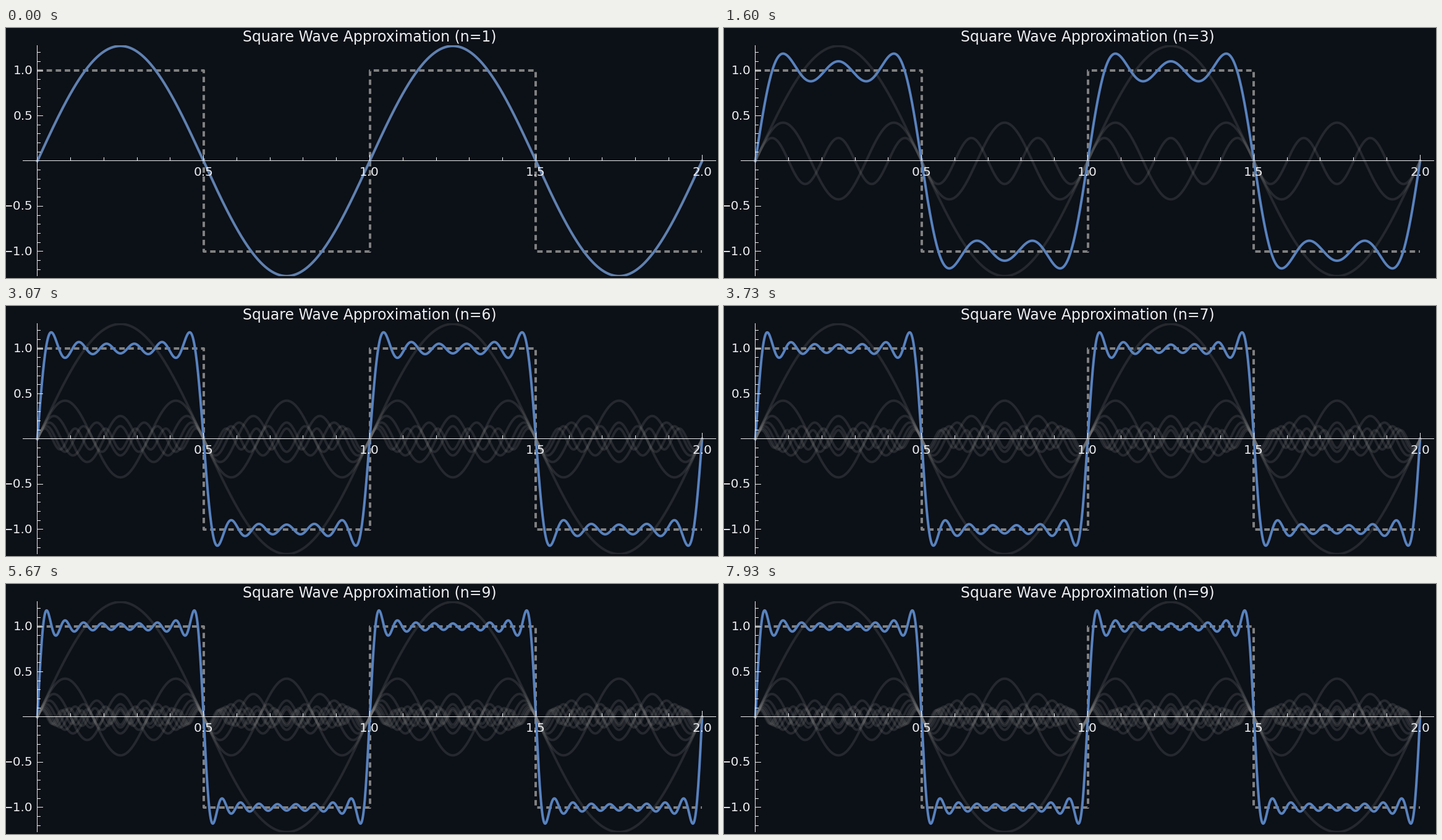
These frames come from a looping animation (1152x406 px, 8000 ms). A matplotlib script:

```python
import numpy as np
import matplotlib.pyplot as plt
from matplotlib.animation import FuncAnimation
from matplotlib.patches import Rectangle

W, H, DPI = 1152, 406, 64
LOOP, STEP = 8000, 40
PT = 72 / DPI  # points per pixel

BG, INK = "#0c1017", "#eceef0"
BLUE, GRAY = "#5882be", "#808080"

LEFT, RIGHT, TOP, BOTTOM = 27, 1149, 28, 403
ORIGIN_X, ORIGIN_Y = 50.75, 216
UNIT_X, UNIT_Y = 537.75, 146.75

MAX_TERMS = 10
# Times at which the number of terms rises by one, and falls back by one
RISES = [333, 1000, 1667, 2333, 3067, 3667, 4333, 5000, 5733]
FALL = 7667

plt.rcParams["font.family"] = "DejaVu Sans"
fig = plt.figure(figsize=(W / DPI, H / DPI), dpi=DPI, facecolor=BG)
ax = fig.add_axes([0, 0, 1, 1])
ax.set_xlim(0, W)
ax.set_ylim(H, 0)
ax.axis("off")


def px(x):
    return ORIGIN_X + UNIT_X * np.asarray(x)


def py(y):
    return ORIGIN_Y - UNIT_Y * np.asarray(y)


def mid(v):
    """Centre of the pixel that holds v, for crisp thin lines."""
    return np.ceil(v) - 0.5


def curve(x, y, color, z, **style):
    line, = ax.plot(px(x), py(y), color=color, lw=4 * PT, zorder=z, **style)
    line.set_clip_path(Rectangle((LEFT, TOP), RIGHT - LEFT, BOTTOM - TOP,
                                 transform=ax.transData))
    return line


def rule(x0, y0, x1, y1):
    ax.plot([x0, x1], [y0, y1], color=INK, lw=PT, zorder=5,
            solid_capstyle="butt", snap=False)


def label(x, y, text, size, ha="center"):
    return ax.text(x, y, text, fontsize=size * PT, color=INK, ha=ha,
                   va="baseline", zorder=6)


def draw_axes():
    x0, y0 = np.floor(ORIGIN_X) + 0.5, mid(ORIGIN_Y)
    rule(LEFT, y0, RIGHT, y0)
    rule(x0, TOP, x0, BOTTOM)
    for i in range(1, 21):
        x = np.floor(px(i / 10)) + 0.5
        major = i % 5 == 0
        rule(x, y0, x, y0 - (9.5 if major else 5.5))
        if major:
            label(px(i / 10) - 0.25, 240.5, f"{i / 10:.1f}", 20)
    for i in range(-12, 13):
        y = py(i / 10)
        major = i % 5 == 0
        rule(x0, mid(y), x0 + (9.5 if major else 5.5), mid(y))
        if major and i:
            text = f"{i / 10:.1f}".replace("-", "\u2212")
            label(43.5, y + 6, text, 20, ha="right")


t = np.linspace(0, 2, 1201)
terms = np.array([4 / np.pi * np.sin(2 * np.pi * k * t) / k
                  for k in range(1, 2 * MAX_TERMS, 2)])
sums = np.cumsum(terms, axis=0)

# The ideal square wave; dash lengths are in units of the line width
curve([0, .5, .5, 1, 1, 1.5, 1.5, 2], [1, 1, -1, -1, 1, 1, -1, -1], GRAY, 1,
      linestyle=(0, (2.2, 1.475)), dash_capstyle="butt")
wave = curve(t, sums[0], BLUE, 2)
harmonics = [curve(t, y, GRAY, 3, alpha=0.22) for y in terms]
draw_axes()
title = label((LEFT + RIGHT) / 2, 22, "", 23.65)


def term_count(ms):
    return 1 + sum(ms > rise for rise in RISES) - (ms > FALL)


def update(frame):
    n = term_count((frame + 1) * STEP)
    wave.set_ydata(py(sums[n - 1]))
    for i, line in enumerate(harmonics):
        line.set_visible(i < n)
    title.set_text(f"Square Wave Approximation (n={n})")
    return [wave, title, *harmonics]


anim = FuncAnimation(fig, update, frames=LOOP // STEP, interval=STEP,
                     repeat=True, repeat_delay=0)
plt.show()
```
